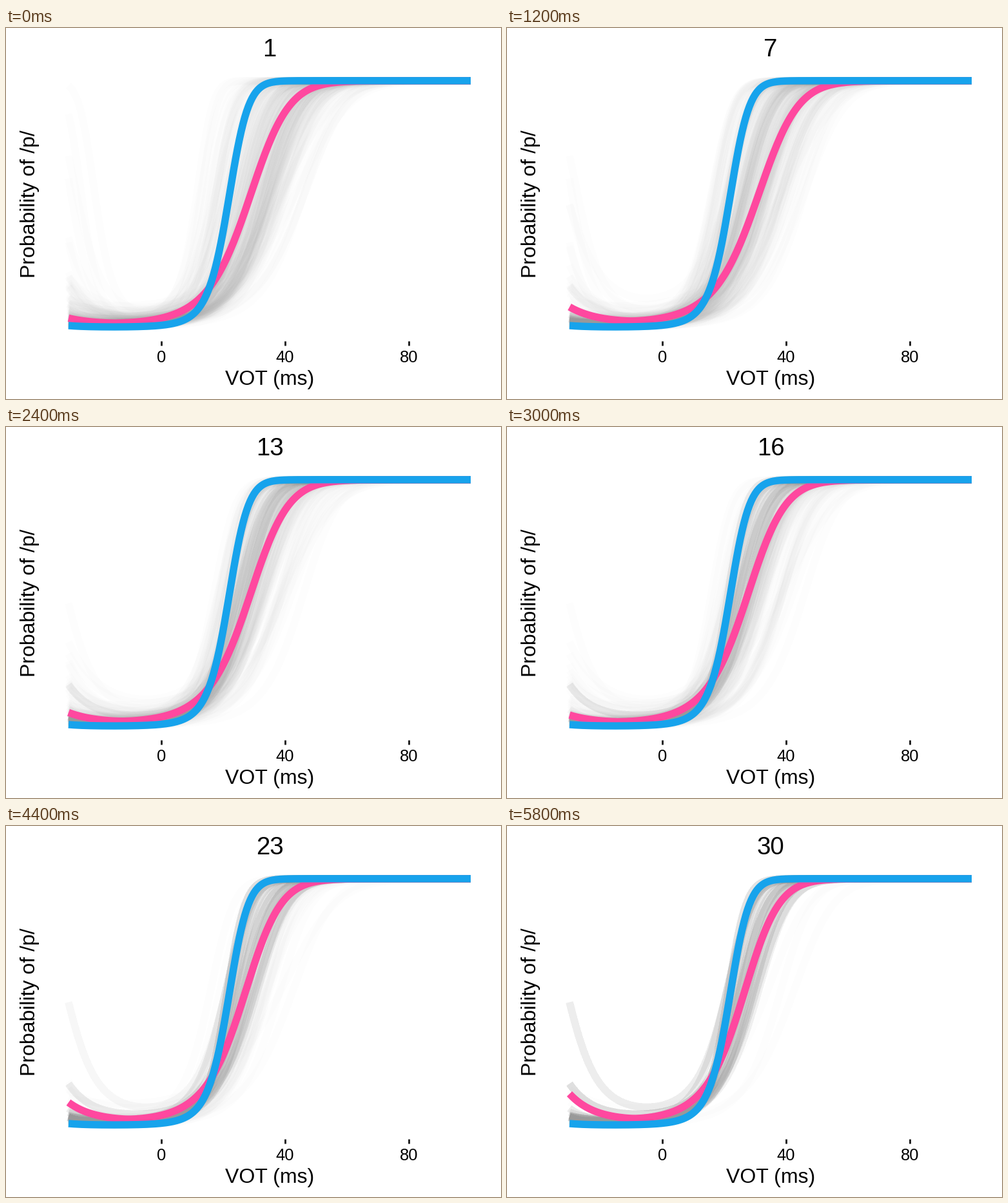
Animation of 768x576 px, one loop 6 s. Source, as a matplotlib script:

```python
import numpy as np
import matplotlib.pyplot as plt
from matplotlib.animation import FuncAnimation
from matplotlib.collections import LineCollection

W, H, DPI = 768, 576, 100
STEPS, INTERVAL = 30, 200
AGENTS, TYPES = 150, 14
LINE = 11.4
PINK, BLUE = "#FF489F", "#17A3EC"

plt.rcParams["font.family"] = "Liberation Sans"

vot = np.linspace(-30, 100, 220)


def pt(px):
    return px * 72 / DPI


def to_x(v):
    return 241 + 4.8 * v


def to_y(p):
    return 465.6 - 383.8 * p


def u_curve(mid, vertex, depth, power=2):
    """Logistic of a bowl: lowest at vertex, one half at mid."""
    reach = np.abs((vot - vertex) / (mid - vertex))
    return 1 / (1 + np.exp(-depth * (reach ** power - 1)))


# Listeners gradually settle on a few shared curves; rows are (mid, vertex, depth)
rng = np.random.default_rng(12)

types = np.vstack([
    [20, -5, 2.5],
    [24, -8, 3.0],
    np.column_stack([np.linspace(20, 30, TYPES),
                     rng.normal(-14, 2.5, TYPES),
                     rng.normal(4.1, 0.5, TYPES)]),
])
share = np.r_[0.055, 0.09, np.full(TYPES, 0.855 / TYPES)]


def fresh(step):
    """Random rows whose spread shrinks with time."""
    mid = np.clip(rng.normal(29 - 0.1 * step, 7.8 - 0.16 * step, AGENTS), 11, 45)
    vertex = np.minimum(-18 + rng.exponential(4, AGENTS), -5)
    depth = 4.4 - 0.12 * (vertex + 18) + rng.normal(0, 0.5, AGENTS)
    return np.column_stack([mid, vertex, np.maximum(depth, 2)])


def evolve():
    history = [fresh(0)]
    for step in range(1, STEPS):
        hop = rng.random(AGENTS) < 0.16
        settle = rng.random(AGENTS) < step / 20
        pick = types[rng.choice(len(types), AGENTS, p=share)]
        new = np.where(settle[:, None], pick, fresh(step))
        history.append(np.where(hop[:, None], new, history[-1]))
    return history


population = evolve()


def pink_curve(step):
    mid = np.interp(step, [0, 6, 15, 29], [27.8, 30, 26.7, 25.5])
    vertex = np.interp(step, [0, 6, 15, 19, 29], [-15, -10, -14, -11, -9])
    return u_curve(mid, vertex, 2.8 - 0.075 * vertex, 1.6)


fig = plt.figure(figsize=(W / DPI, H / DPI), dpi=DPI, facecolor="white")
ax = fig.add_axes([0, 0, 1, 1])
ax.set_xlim(0, W)
ax.set_ylim(H, 0)
ax.axis("off")

xs = to_x(vot)
crowd = LineCollection([], colors=[(0.6, 0.6, 0.6, 0.021)],
                       linewidths=pt(LINE), capstyle="butt", zorder=1)
ax.add_collection(crowd, autolim=False)


def thick(p, color, z):
    line, = ax.plot(xs, to_y(p), color=color, lw=pt(LINE), zorder=z,
                    solid_capstyle="butt", solid_joinstyle="round")
    return line


def label(x, y, text, size, **kw):
    return ax.text(x, y, text, fontsize=pt(size), color="black",
                   ha="center", va="baseline", **kw)


pink = thick(pink_curve(0), PINK, 2)
thick(u_curve(21.5, -15.5, 5.5), BLUE, 3)

for value in (0, 40, 80):
    x = to_x(value)
    ax.plot([x, x], [485.5, 493], color="#1A1A1A", lw=pt(2.85), solid_capstyle="butt")
    label(x, 519, str(value), 25.6)

label(409, 554, "VOT (ms)", 32)
label(45, 273.5, "Probability of /p/", 32, rotation=90, rotation_mode="anchor")
title = label(409, 44, "1", 38.4)


def update(step):
    crowd.set_segments([np.column_stack([xs, to_y(u_curve(*row))])
                        for row in population[step]])
    pink.set_ydata(to_y(pink_curve(step)))
    title.set_text(str(step + 1))
    return crowd, pink, title


anim = FuncAnimation(fig, update, frames=STEPS, interval=INTERVAL,
                     repeat=True, repeat_delay=0, blit=False)
plt.show()
```
